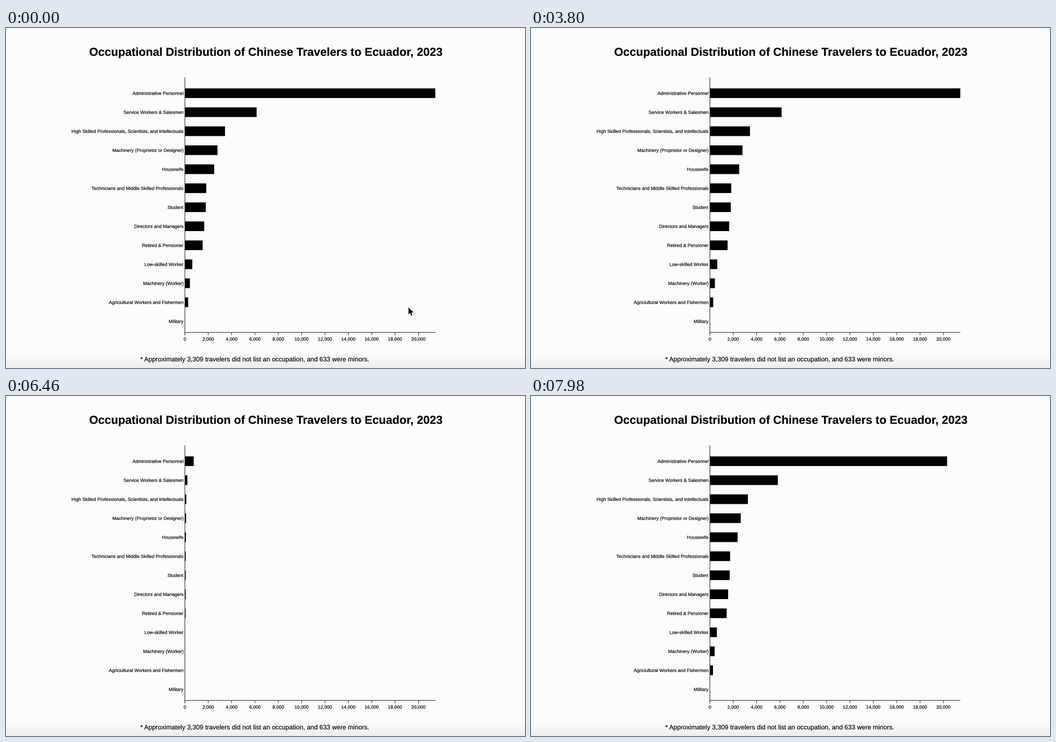
A matplotlib script that plays this animation: 924 px wide and 606 px high, repeating every 8000 ms.

```python
import numpy as np
import matplotlib.pyplot as plt
from matplotlib.animation import FuncAnimation
from matplotlib.patches import PathPatch, Polygon, Rectangle
from matplotlib.path import Path
from matplotlib.textpath import TextPath
from matplotlib.transforms import Affine2D

W, H, DPI = 924, 606, 96
STEP, LOOP = 20, 8000
S = 0.825                       # page zoom
X0, X1 = 318.5, 764.3           # value axis from end to end
Y0, Y1 = 88, 542.4
UNIT = (X1 - X0) / 21443        # pixels per traveler
ROW, PITCH, THICK = 116.2, 33.88, 17.2

ROWS = [
    ("Administrative Personnel", 21443),
    ("Service Workers & Salesmen", 6142),
    ("High Skilled Professionals, Scientists, and Intellectuals", 3434),
    ("Machinery (Proprietor or Designer)", 2790),
    ("Housewife", 2506),
    ("Technicians and Middle Skilled Professionals", 1828),
    ("Student", 1789),
    ("Directors and Managers", 1650),
    ("Retired & Pensioner", 1515),
    ("Low-skilled Worker", 630),
    ("Machinery (Worker)", 428),
    ("Agriciultural Workers and Fishermen", 279),
    ("Military", 2),
]

CLEAR, GROW, GROW_TIME = 5160, 5897, 2728
START, REST, EXIT = (716.6, 497.8), (796.8, 441.8), (945, 400)

fig = plt.figure(figsize=(W / DPI, H / DPI), dpi=DPI, facecolor="#fcfcfc")
ax = fig.add_axes([0, 0, 1, 1])
ax.axis("off")

# Page background, shaded toward the bottom edge
shade = 252 - 16 * np.clip((np.arange(H) - 574) / 32, 0, 1) ** 1.3
ax.imshow(shade[:, None], cmap="gray", vmin=0, vmax=255, aspect="auto",
          extent=(0, W, H, 0), interpolation="nearest")
ax.set_xlim(0, W)
ax.set_ylim(H, 0)


def text_path(s, x, y, size, align=0.0, weight="normal"):
    """Outline of s with its baseline at y; align 0 left, 0.5 middle, 1 right."""
    path = TextPath((0, 0), s, size=size,
                    prop={"family": "Liberation Sans", "weight": weight})
    box = path.get_extents()
    shift = x - (box.x0 + align * box.width)
    return Affine2D().scale(1, -1).translate(shift, y).transform_path(path)


def line(xs, ys):
    ax.plot(xs, ys, color="black", lw=S * 72 / DPI, snap=False,
            solid_capstyle="butt")


texts = [
    text_path("Occupational Distribution of Chinese Travelers to Ecuador, 2023",
              462.7, 49.6, 25 * S, 0.5, "bold"),
    text_path("* Approximately 3,309 travelers did not list an occupation, "
              "and 633 were minors.", 442.4, 594.2, 14 * S, 0.5),
]

bars = []
for i, (name, count) in enumerate(ROWS):
    cy = ROW + i * PITCH
    texts.append(text_path(name, 315.8, cy + 3, 10 * S, 1))
    bar = Rectangle((X0, cy - THICK / 2), 0, THICK, fc="black", lw=0,
                    snap=False)
    bars.append((ax.add_patch(bar), count * UNIT))

line([X0, X0], [Y0, Y1 + 5])
line([X0, X1], [Y1, Y1])
for v in range(0, 21000, 2000):
    x = X0 + v * UNIT
    line([x, x], [Y1, Y1 + 5])
    texts.append(text_path(f"{v:,}", x, 557.2, 10 * S, 0.5))

ax.add_patch(PathPatch(Path.make_compound_path(*texts), fc="black",
                       ec="black", lw=0.12))

# Mouse pointer with a soft shadow
ARROW = np.array([(0, 0), (0, 12.6), (2.8, 10), (4.9, 14.8), (6.9, 13.9),
                  (4.9, 9.3), (8.7, 9.3)])
pointer = []
for dy, color, alpha, lw in [(1.6, "black", 0.05, 3), (1.3, "black", 0.08, 1.8),
                             (0, "white", 1, 1.5), (0, "black", 1, 0)]:
    part = Polygon(ARROW, fc=color, ec=color, alpha=alpha, lw=lw, zorder=5,
                   joinstyle="round")
    pointer.append((ax.add_patch(part), dy))


def progress(t, start, span):
    return min(max((t - start) / span, 0), 1)


def cubic(p):
    return 4 * p ** 3 if p < 0.5 else 1 - 4 * (1 - p) ** 3


def glide(a, b, p):
    return np.array(a) + (np.array(b) - np.array(a)) * p


def update(n):
    t = n * STEP
    full = 1 if t < CLEAR else cubic(progress(t, GROW, GROW_TIME))
    for bar, width in bars:
        bar.set_width(width * full)

    if t < 1380:
        p = progress(t, 0, 560)
        tip = glide(START, REST, p * p * (3 - 2 * p))
    else:
        tip = glide(REST, EXIT, progress(t, 1380, 400) ** 2)
    for part, dy in pointer:
        part.set_xy(ARROW + tip + (0, dy))
        part.set_visible(tip[0] < W)
    return []


anim = FuncAnimation(fig, update, frames=LOOP // STEP, interval=STEP,
                     repeat=True, repeat_delay=0, blit=False)
plt.show()
```
